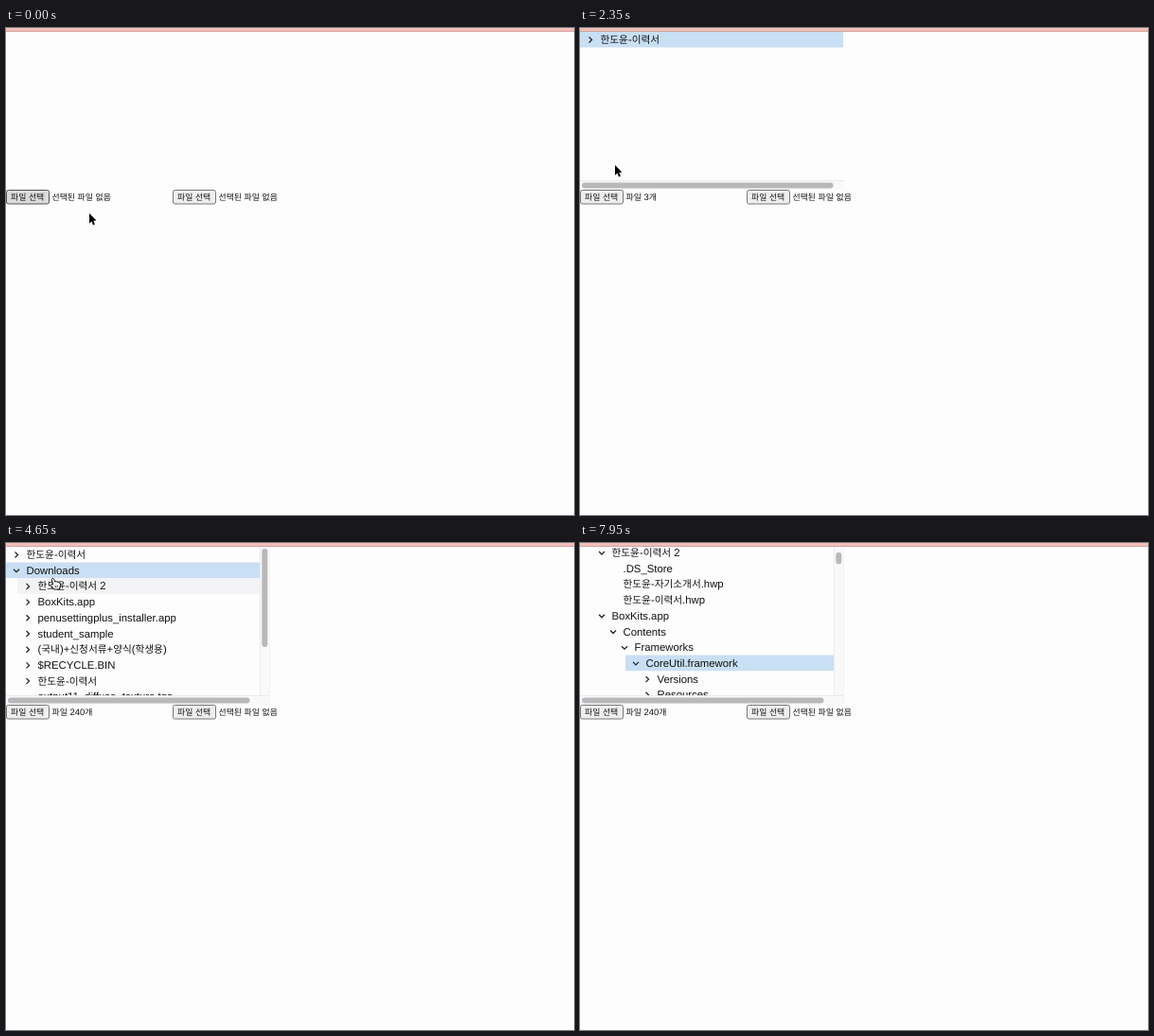
Write an HTML page with a canvas that moves like this. It is 600 by 515 pixels and loops after 8250 ms.

```html
<!DOCTYPE html>
<html lang="ko">
<head>
<meta charset="utf-8">
<title>Folder upload tree</title>
<style>
  html, body { margin: 0; width: 100%; height: 100%; overflow: hidden; background: #fefdfe; }
  canvas { display: block; }
</style>
</head>
<body>
<canvas id="stage" width="600" height="515"></canvas>
<script>
const c = document.getElementById('stage').getContext('2d');
const LOOP = 8250, STEP = 50, ROW = 16.7, NEVER = Infinity;
const ARIAL = '"Liberation Sans", Arial, sans-serif';
const UI = 'Inter, Roboto, sans-serif';
const KOREAN = '"Noto Sans CJK KR", "Noto Sans CJK JP", "Noto Sans CJK", sans-serif';
const NAME = '한도윤-이력서';

// Tree nodes: level, name, time it opens (undefined for a plain file)
const nodes = [
  [0, NAME, NEVER],
  [0, 'Downloads', 4550],
  [1, NAME + ' 2', 5150],
  [2, '.DS_Store'],
  [2, '한도윤-자기소개서.hwp'],
  [2, NAME + '.hwp'],
  [1, 'BoxKits.app', 5450],
  [2, 'Contents', 5750],
  [3, 'Frameworks', 6900],
  [4, 'CoreUtil.framework', 7450],
  [5, 'Versions', NEVER],
  [5, 'Resources', NEVER],
  [5, 'CoreUtil'],
  [3, 'Resources', NEVER],
  [3, 'MacOS', NEVER],
  [3, 'Info.plist'],
  [3, 'PkgInfo'],
  [1, 'penusettingplus_installer.app', NEVER],
  [1, 'student_sample', NEVER],
  [1, '(국내)+신청서류+양식(학생용)', NEVER],
  [1, '$RECYCLE.BIN', NEVER],
  [1, NAME, NEVER],
  [1, 'output11_diffuse_texture.tga']
];
const rootsAt = [1600, 4400];
const picks = [[0, -1], [2000, 0], [4550, 1], [5150, 2], [5450, 6], [5750, 7], [6900, 8], [7450, 9]];
const thumbs = [[4550, 104], [5150, 84], [5450, 80], [5750, 14], [7450, 12.5]];
const scrolls = [[5800, 0], [6150, 60], [6250, 60], [6500, 0], [6950, 0], [7250, 35.4]];
const mouse = [
  [0, 88, 196], [400, 335, 198], [500, 335, 198], [850, 172, 252], [950, 162, 250],
  [1150, 330, 382], [1400, 562, 62], [1500, 564, 63], [1700, 130, 60], [1900, 60, 14],
  [2150, 54, 15], [2350, 37, 145], [2500, 26, 179], [2650, 26, 180], [3000, 212, 239],
  [3150, 215, 239], [3600, 640, 440], [3950, 640, 440], [4250, 568, 62], [4350, 566, 61],
  [4500, 56, 30], [4650, 50, 38], [5050, 56, 45], [5200, 60, 47], [5400, 72, 113],
  [5500, 76, 114], [5700, 104, 130], [6600, 123, 134], [6850, 92, 147], [6950, 94, 148],
  [7100, 272, 180], [7400, 112, 127], [7500, 108, 126], [7650, 62, 122], [7750, 150, 112],
  [7900, 384, 6], [7950, 430, -40], [8250, 430, -40]
];
const files = [
  '(국내)+신청서류+양식(학생용)', NAME, NAME + ' 2', 'student_sample',
  '(국내) 학생 인…첨 매뉴얼.pdf', '(국내)+신청서…식(학생용).zip', '(국내)+학생+…정+매뉴얼.pdf',
  ...[1, 2, 3].map(n => `[노을] 22(상)…로젝트 (${n}).pdf`), '[노을] 22(상)…프로젝트.pdf',
  ...[1, 2, 3, 4].map(n => `[노을] 2022…도윤님 (${n}).pdf`), '[노을] 2022년…_한도윤님.pdf'
];
const places = [
  ['Nimbo Drive', 157, 'dot'], ['응용 프로그램', 198.5, 'dot'], ['데스크탑', 218, 'desk'],
  ['다운로드', 237.5, 'down'], ['문서', 257, 'doc'], ['handoyoon', 276.5, 'home'],
  ["한도윤's No…", 318.5, 'laptop'], ['네트워크', 338, 'globe']
];
const tags = [['Red', '#e2665f'], ['Orange', '#e8a145'], ['Yellow', '#e3c04b'], ['Green', '#67b865'], ['Blue', '#5a93dc']];

const last = (list, t) => list.filter(k => k[0] <= t).pop();
const ramp = (t, a, b) => Math.max(0, Math.min(1, (t - a) / (b - a)));
const pulse = (t, a, b) => Math.min(ramp(t, a, a + 100), 1 - ramp(t, b, b + 100));

function track(keys, t, i = 1) {
  const n = keys.findIndex(k => k[0] > t);
  if (n === 0) return keys[0][i];
  if (n < 0) return keys[keys.length - 1][i];
  const a = keys[n - 1], b = keys[n], p = ramp(t, a[0], b[0]);
  return a[i] + (b[i] - a[i]) * p * p * (3 - 2 * p);
}

function rect(x, y, w, h, fill, r = 0, stroke, line = 1) {
  c.beginPath();
  c.roundRect(x, y, w, h, r);
  if (fill) { c.fillStyle = fill; c.fill(); }
  if (stroke) { c.strokeStyle = stroke; c.lineWidth = line; c.stroke(); }
}

function path(x, y, pts, stroke, line = 1, fill) {
  c.beginPath();
  for (let i = 0; i < pts.length; i += 2) c.lineTo(x + pts[i], y + pts[i + 1]);
  if (fill) { c.closePath(); c.fillStyle = fill; }
  if (stroke) { c.strokeStyle = stroke; c.lineWidth = line; c.stroke(); }
  if (fill) c.fill();
}

function circle(x, y, r, fill, stroke) {
  rect(x - r, y - r, 2 * r, 2 * r, fill, r, stroke, 0.9);
}

// Hangul runs use their own font at a slightly smaller size
function text(s, x, y, size, color, font = ARIAL, weight = 400, centered) {
  const runs = s.split(/([가-힣]+)/).filter(Boolean).map(r => {
    const f = /[가-힣]/.test(r) ? `${weight} ${size * 0.94}px ${KOREAN}` : `${weight} ${size}px ${font}`;
    c.font = f;
    return [r, f, c.measureText(r).width];
  });
  if (centered) x -= runs.reduce((sum, r) => sum + r[2], 0) / 2;
  c.fillStyle = color;
  for (const [r, f, w] of runs) {
    c.font = f;
    c.fillText(r, x, y);
    x += w;
  }
}

function chevron(x, y, dir, color, s = 3, line = 1.3) {
  const pts = {
    right: [-s / 2, -s, s / 2, 0, -s / 2, s], left: [s / 2, -s, -s / 2, 0, s / 2, s],
    down: [-s, -s / 2, 0, s / 2, s, -s / 2], up: [-s, s / 2, 0, -s / 2, s, s / 2]
  };
  path(x, y, pts[dir], color, line);
}

function visibleNodes(t) {
  let hidden = NEVER, root = -1;
  return nodes.map((n, id) => ({ level: n[0], name: n[1], opens: n[2], id })).filter(n => {
    if (n.level === 0) root++;
    if (t < rootsAt[root] || n.level > hidden) return false;
    hidden = n.opens <= t ? NEVER : n.level;
    return true;
  });
}

function tree(t, mx, my, modal) {
  if (t < rootsAt[0]) return;
  const thumb = last(thumbs, t), w = thumb ? 268 : 278;
  const scroll = track(scrolls, t), picked = last(picks, t)[1];
  c.save();
  c.beginPath();
  c.rect(0, 4, w, 157);
  c.clip();
  visibleNodes(t).forEach((n, i) => {
    const y = 12 + ROW * i - scroll, x = 12 * n.level, top = y - 8.3;
    const over = !modal && mx < w && my < 161 && my >= top && my < top + ROW;
    if (n.id === picked) rect(x, top, w - x, ROW, modal ? '#f2f3fc' : '#c9dff4');
    else if (over) rect(x, top, w - x, ROW, '#f3f2f4');
    if (n.opens) chevron(x + 11, y + 0.5, n.opens <= t ? 'down' : 'right', '#222');
    text(n.name, x + 21.5, y + 4, 11.35, '#111');
  });
  c.restore();
  rect(0, 161, 278.5, 10, '#faf9fa');
  rect(0, 161, 278.5, 0.7, '#e6e5e6');
  rect(2, 163.5, w - 12.5, 6, '#bab8ba', 3);
  if (thumb) {
    rect(268, 4, 10.5, 157, '#faf9fa');
    rect(268, 4, 0.7, 157, '#e6e5e6');
    rect(278, 4, 0.7, 167, '#efeeef');
    rect(270.3, 6 + scroll * 0.11, 6, thumb[1], '#bab8ba', 3);
  }
}

function fileInput(x, label, pressed) {
  rect(x + 0.5, 171.5, 45, 14.5, pressed ? '#dcdbdc' : '#efeeef', 2, pressed ? '#555' : '#777');
  text('파일 선택', x + 5, 181.8, 9.45, '#111');
  text(label, x + 48.5, 181.8, 9.45, '#111');
}

function folder(x, y) {
  rect(x, y - 4.5, 5, 3, '#2d8fd0', 1);
  rect(x, y - 3.5, 11, 8, '#42a9e8', 1);
  rect(x, y - 1.8, 11, 0.8, '#7fc8f3');
}

function icon(kind, x, y, color) {
  if (kind === 'dot') return circle(x, y, 4, color);
  if (kind === 'down' || kind === 'globe') {
    circle(x, y, 4.2, null, color);
    path(x, y, [0, -2.5, 0, 2.5], color, 0.9);
    if (kind === 'down') path(x, y, [-1.8, 0.6, 0, 2.5, 1.8, 0.6], color, 0.9);
    else path(x, y, [-4, 0, 4, 0], color, 0.9);
  } else if (kind === 'doc') rect(x - 3, y - 4.3, 6, 8.6, null, 1, color, 0.9);
  else if (kind === 'home') {
    path(x, y, [-4.7, 0, 0, -4.3, 4.7, 0], color, 0.9);
    path(x, y, [-3.2, -1, -3.2, 4, 3.2, 4, 3.2, -1], color, 0.9);
  } else {
    rect(x - 4, y - 3.5, 8, 6.5, null, 1, color, 0.9);
    if (kind === 'desk') path(x, y, [-3, 1, 3, 1], color, 1.2);
    else path(x, y, [-5.5, 3.7, 5.5, 3.7], color, 0.9);
  }
}

function shadow(color, blur, dy) {
  c.shadowColor = color;
  c.shadowBlur = blur;
  c.shadowOffsetY = dy;
}

function sidebar() {
  const grey = '#858082', blue = '#6f9fd0';
  rect(174, 228, 83, 19, '#c1bcbd', 4);
  [['Nimbo', 144.2], ['즐겨찾기', 184.7], ['위치', 304.7], ['태그', 365.7]]
    .forEach(([s, y]) => text(s, 178, y, 7.8, '#8d888a', UI, 600));
  places.forEach(([s, y, kind], i) => {
    icon(kind, 185, y, i === 0 || i > 5 ? '#949094' : blue);
    text(s, 195, y + 3.2, 8.8, i === 3 ? '#4d494b' : grey, UI, 500);
  });
  tags.forEach(([s, color], i) => {
    const y = 379.5 + 19.5 * i;
    circle(185, y, 3.4, color);
    text(s, 195, y + 3.2, 8.8, grey, UI, 500);
  });
  rect(267, 127, 5, 274, '#a5a0a2', 2.5);
}

function toolbar() {
  const edge = '#dddcdd', ink = '#444';
  rect(288.5, 138.5, 33, 15, '#fff', 4, edge);
  rect(305, 139, 0.7, 14, edge);
  chevron(297, 146, 'left', '#333', 3.5);
  chevron(314, 146, 'right', '#bbb', 3.5);
  rect(327.5, 138.5, 32, 15, '#fff', 4, edge);
  rect(334.5, 142.5, 9, 7.5, null, 1, ink, 0.9);
  path(334.5, 142.5, [3, 0, 3, 7.5], ink, 0.9);
  path(334.5, 142.5, [6, 0, 6, 7.5], ink, 0.9);
  chevron(352, 146, 'down', '#333', 2.2, 1.2);
  rect(364.5, 138.5, 32, 15, '#fff', 4, edge);
  for (let i = 0; i < 9; i++) rect(372 + (i % 3) * 3, 142 + Math.floor(i / 3) * 3, 2, 2, ink);
  chevron(389, 146, 'down', '#333', 2.2, 1.2);
  rect(427, 138.5, 145, 15, '#fff', 4, edge);
  folder(433, 146);
  text('다운로드', 447, 149.2, 8.8, '#222', UI, 500);
  chevron(564.5, 143.8, 'up', '#333', 2, 1.2);
  chevron(564.5, 148.2, 'down', '#333', 2, 1.2);
}

function picker(alpha, picked) {
  if (!alpha) return;
  c.save();
  c.globalAlpha = alpha;
  rect(0, 0, 600, 515, 'rgba(0,0,0,.22)');
  shadow('rgba(0,0,0,.45)', 22, 7);
  rect(167, 125, 500, 336.5, '#d6d1d2', 8);
  shadow('transparent', 0, 0);
  c.beginPath();
  c.roundRect(167, 125, 500, 336.5, 8);
  c.clip();
  rect(274, 125, 400, 340, '#fefdfe');
  sidebar();
  toolbar();
  rect(274, 167.5, 326, 0.8, '#e2e1e2');
  rect(274, 418.5, 326, 0.8, '#d8d7d8');
  files.forEach((s, i) => {
    const y = 180 + 15.3 * i, on = picked && i === 1;
    if (on) rect(279, y - 7.6, 152, 15.2, '#2a68d8', 4);
    if (i < 4) {
      folder(286.5, y);
      chevron(422, y, 'right', on ? '#fff' : '#777', 2.3, 1);
    } else {
      rect(288, y - 5, 8, 10, '#f7f6f7', 1, '#dcdbdc', 0.7);
      circle(292, y, 1.8, '#a3a8b4');
    }
    text(s, 301, y + 3.2, 8.8, on ? '#fff' : i < 4 ? '#222' : '#aeacae', UI, i < 4 ? 500 : 400);
  });
  rect(435, 168, 10.5, 250, '#f9f8f9', 0, '#e6e5e6', 0.7);
  rect(437.5, 170, 5.5, 87, '#bdbbbd', 2.7);
  rect(438.5, 411, 0.9, 5.5, '#888');
  rect(441, 411, 0.9, 5.5, '#888');
  c.restore();
  c.save();
  c.globalAlpha = alpha;
  rect(167, 125, 500, 336.5, null, 8, 'rgba(90,80,85,.35)', 0.7);
  c.restore();
}

function confirmBox(alpha, count, name) {
  if (!alpha) return;
  c.save();
  c.globalAlpha = alpha;
  shadow('rgba(0,0,0,.5)', 10, 2);
  rect(290, -20, 330, 103, '#fefdfe', 4);
  shadow('transparent', 0, 0);
  text(`파일 ${count}개를 이 사이트에 업로드하시겠습니까?`, 301, 1.8, 10.5, '#222', UI, 600);
  text(`'${name}'의 모든 파일이 업로드됩니다. 사이트를 신뢰할 수 있을 때만 실행`, 301, 21.5, 9.1, '#444', UI);
  text('하세요.', 301, 35.5, 9.1, '#444', UI);
  rect(495.8, 50.3, 44.4, 22, '#fefdfe', 4, '#1a5fc4', 1.7);
  text('취소', 517.5, 64.2, 8.6, '#1b66cf', UI, 600, true);
  rect(546, 50.3, 44, 22, '#1967e0', 3);
  text('업로드', 567.5, 64.2, 8.6, '#fff', UI, 600, true);
  c.restore();
}

function arrow(x, y) {
  const pts = [0, 0, 0, 10.8, 2.4, 8.6, 4.1, 12.4, 5.9, 11.6, 4.3, 7.9, 7.4, 7.6, 0, 0];
  c.lineJoin = 'round';
  path(x, y, pts, '#fff', 1.8, '#000');
  c.lineJoin = 'miter';
}

function hand(x, y) {
  c.save();
  c.translate(x, y);
  c.beginPath();
  c.moveTo(-1.8, 0.5);
  c.quadraticCurveTo(-1, -1.8, 0.6, 0.2);
  c.lineTo(1.8, 3.2);
  c.quadraticCurveTo(3, 2, 4, 3.2);
  c.quadraticCurveTo(5.2, 2.4, 6, 3.8);
  c.quadraticCurveTo(7.6, 3.6, 7.6, 6);
  c.lineTo(6.4, 11);
  c.lineTo(0.8, 11);
  c.lineTo(-3, 6.4);
  c.quadraticCurveTo(-2.6, 4.8, -0.2, 6);
  c.closePath();
  c.fillStyle = '#fff';
  c.fill();
  c.strokeStyle = '#111';
  c.lineWidth = 1;
  c.stroke();
  path(0, 0, [2.2, 6.5, 2.4, 9.2], '#111', 0.7);
  path(0, 0, [4.2, 6.5, 4.2, 9.2], '#111', 0.7);
  c.restore();
}

function draw(t) {
  const mx = track(mouse, t, 1), my = track(mouse, t, 2);
  const first = pulse(t, 50, 750), second = pulse(t, 2600, 3900);
  const modal = first + second > 0;
  const overInput = x => !modal && mx >= x && mx < x + 46 && my > 171 && my < 186;
  c.textRendering = 'geometricPrecision';
  rect(0, 0, 600, 515, '#fefdfe');
  rect(0, 0, 600, 3.2, '#f2c0b9');
  rect(0, 3, 600, 1, '#cfa19c');
  tree(t, mx, my, modal);
  const label = t < rootsAt[0] ? '선택된 파일 없음' : t < rootsAt[1] ? '파일 3개' : '파일 240개';
  fileInput(0, label, t < 100 || overInput(0));
  fileInput(176, '선택된 파일 없음', overInput(176));
  picker(first, t >= 450);
  picker(second, false);
  confirmBox(pulse(t, 800, 1500), 3, NAME);
  confirmBox(pulse(t, 4000, 4300), 240, 'Downloads');
  const rowsEnd = 4 + visibleNodes(t).length * ROW;
  const onTree = !modal && mx < (t < 4550 ? 278 : 268) && my > 4 && my < Math.min(161, rowsEnd);
  (onTree ? hand : arrow)(mx, my);
}

const start = performance.now();
function frame() {
  const t = (performance.now() - start) % LOOP;
  draw(Math.min(7950, Math.floor(t / STEP) * STEP));
  requestAnimationFrame(frame);
}
frame();
</script>
</body>
</html>
```
